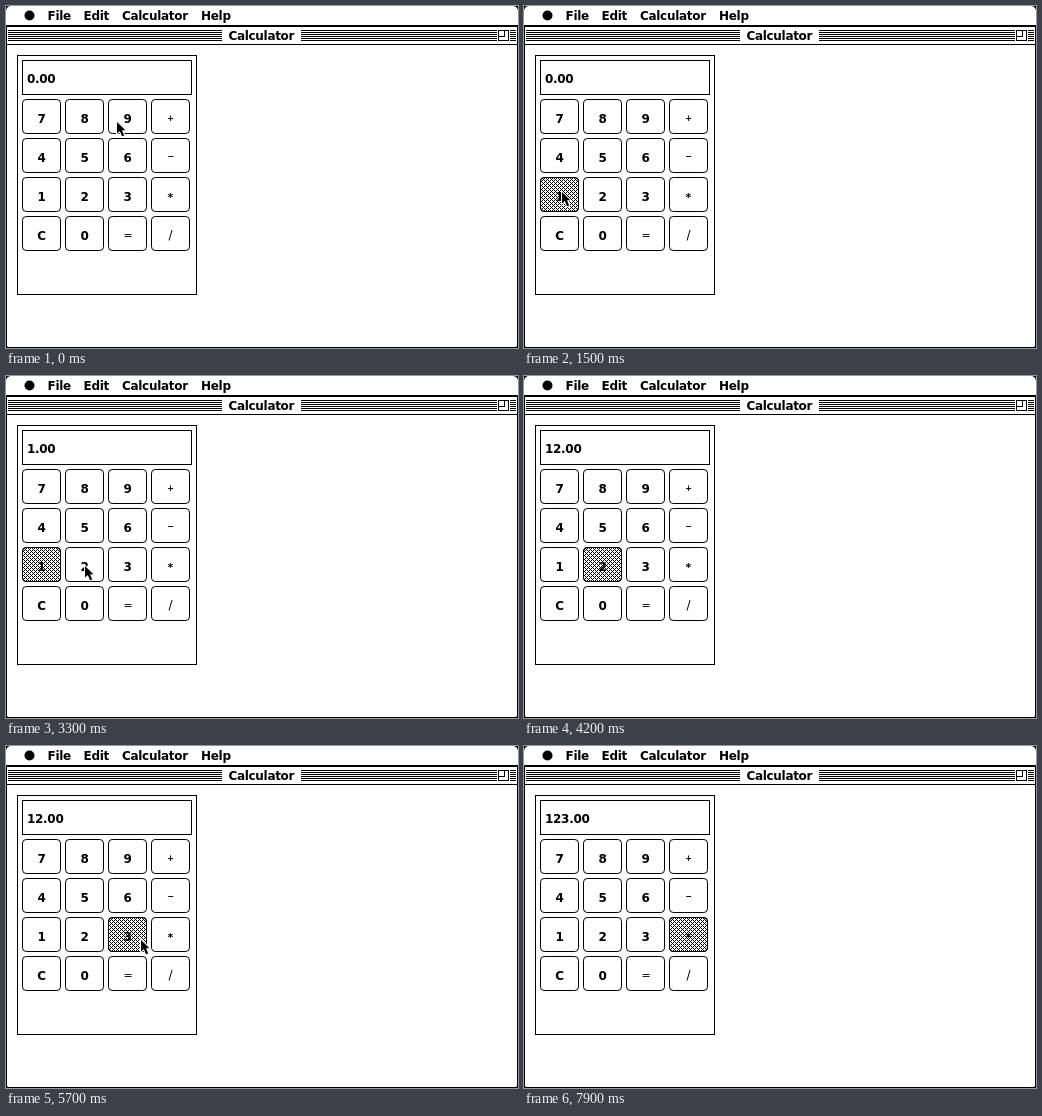
Animation of 512x342 px, one loop 8000 ms. Source, as an HTML page:

```html
<!DOCTYPE html>
<html lang="en">
<head>
<meta charset="utf-8">
<title>Calculator</title>
<style>
html, body { margin: 0; width: 100%; height: 100%; overflow: hidden; background: #000; }
svg { display: block; width: 512px; height: 342px; }
rect, .lines, #grey { shape-rendering: crispEdges; }
.key { shape-rendering: auto; }
.box { fill: #fff; stroke: #000; }
.lines { stroke: #000; fill: none; }
text { font: bold 12px "DejaVu Sans", Verdana, sans-serif; letter-spacing: -.3px; fill: #000; }
.mid { text-anchor: middle; }
.op { letter-spacing: 0; }
.thin { font-weight: normal; }

.hi, .num { opacity: 0; animation: 8s step-end infinite; }
#k1 { animation-name: k1; }
#k2 { animation-name: k2; }
#k3 { animation-name: k3; }
#kx { animation-name: kx; }
#n0 { animation-name: n0; }
#n1 { animation-name: n1; }
#n2 { animation-name: n2; }
#n3 { animation-name: n3; }
#cursor { animation: move 8s linear infinite; }
#arrow { animation: blink 8s step-end infinite; }

@keyframes k1 { 0%, 33.75%, 46.25% { opacity: 0 } 15%, 40% { opacity: 1 } }
@keyframes k2 { 0%, 58.75% { opacity: 0 } 46.25% { opacity: 1 } }
@keyframes k3 { 0%, 65%, 96.25% { opacity: 0 } 58.75%, 71.25% { opacity: 1 } }
@keyframes kx { 0% { opacity: 0 } 96.25%, 100% { opacity: 1 } }
@keyframes n0 { 0% { opacity: 1 } 28.75%, 100% { opacity: 0 } }
@keyframes n1 { 0%, 52.5% { opacity: 0 } 28.75% { opacity: 1 } }
@keyframes n2 { 0%, 77.5% { opacity: 0 } 52.5% { opacity: 1 } }
@keyframes n3 { 0% { opacity: 0 } 77.5%, 100% { opacity: 1 } }
@keyframes blink { 0%, 53.75% { opacity: 1 } 52.5%, 98.75%, 100% { opacity: 0 } }
@keyframes move {
  0%, 1.25% { transform: translate(111px, 116px) }
  6.25% { transform: translate(66px, 174px) }
  11.25%, 28.75% { transform: translate(38px, 186px) }
  35%, 38.75% { transform: translate(57px, 190px) }
  41.25% { transform: translate(79px, 190px) }
  43.75%, 46.25% { transform: translate(87px, 191px) }
  50%, 53.75% { transform: translate(88px, 196px) }
  58.75% { transform: translate(130px, 192px) }
  60% { transform: translate(142px, 191px) }
  62.5%, 77.5% { transform: translate(135px, 194px) }
  78.75% { transform: translate(135px, 197px) }
  80%, 87.5% { transform: translate(135px, 193px) }
  96.25%, 100% { transform: translate(159px, 187px) }
}
</style>
</head>
<body>
<svg viewBox="0 0 512 342">
  <defs>
    <pattern id="grey" width="4" height="4" patternUnits="userSpaceOnUse">
      <path d="M1 0h1v1h-1zM0 1h1v1h-1zM2 1h1v1h-1zM3 2h1v1h-1zM0 3h1v1h-1zM2 3h1v1h-1z"/>
    </pattern>
  </defs>
  <rect width="512" height="342"/>
  <rect class="key" width="512" height="342" rx="5" fill="#fff"/>

  <circle cx="23.5" cy="9.5" r="5"/>
  <text x="41.5" y="14">File</text>
  <text x="77.5" y="14">Edit</text>
  <text x="116" y="14">Calculator</text>
  <text x="195" y="14">Help</text>

  <path class="lines" d="M0 19.5H512M0 20.5H512M0 38.5H512M.5 20V342M511.5 20V342M0 341.5H512"/>
  <path class="lines" id="stripes"/>
  <rect x="216" y="23" width="79" height="13" fill="#fff"/>
  <text class="mid" x="255.3" y="34">Calculator</text>
  <rect x="491" y="23" width="13" height="13" fill="#fff"/>
  <path class="lines" d="M492.5 24.5H502.5V34.5H492.5ZM492.5 30.5H498.5V24.5"/>

  <rect class="box" x="11.5" y="49.5" width="179" height="239"/>
  <rect class="box" x="16.5" y="54.5" width="169" height="34"/>
  <text class="num" id="n0" x="21" y="77">0.00</text>
  <text class="num" id="n1" x="21" y="77">1.00</text>
  <text class="num" id="n2" x="21" y="77">12.00</text>
  <text class="num" id="n3" x="21" y="77">123.00</text>

  <g id="keys"></g>

  <g id="cursor">
    <path id="arrow" d="M0 0V11.5L2.8 9L5 14.3L7.2 13.4L5 8.2H8.4Z" stroke="#fff" stroke-width="2" paint-order="stroke"/>
  </g>
</svg>
<script>
const ids = { 1: 'k1', 2: 'k2', 3: 'k3', '*': 'kx' };
// glyph, font size, x and baseline of the operator signs, extra class
const ops = {
  '+': ['+', 8, 19.5, 21.5, ''],
  '-': ['\u2212', 8, 19.5, 21, ''],
  '*': ['*', 11, 19.5, 24, ''],
  '=': ['=', 11, 20, 23, 'thin'],
  '/': ['/', 12, 19.5, 23, 'thin'],
};

function key(c, i) {
  const x = 16 + i % 4 * 43, y = 93 + (i >> 2) * 39;
  const shape = 'x=".5" y=".5" width="38" height="34" rx="3.7"';
  const shade = ids[c] ? `<rect class="key hi" id="${ids[c]}" ${shape} fill="url(#grey)" stroke="#000"/>` : '';
  const [sign, size, tx, ty, cls] = ops[c] || [c, 12, 19.6, 24, ''];
  const kind = ops[c] ? 'op ' + cls : '';
  return `<g transform="translate(${x} ${y})"><rect class="key box" ${shape}/>${shade}
    <text class="mid ${kind}" style="font-size:${size}px" x="${tx}" y="${ty}">${sign}</text></g>`;
}
document.getElementById('keys').innerHTML = [...'789+456-123*C0=/'].map(key).join('');

let d = '';
for (let y = 24.5; y < 36; y += 2) d += `M2 ${y}H510`;
document.getElementById('stripes').setAttribute('d', d);
</script>
</body>
</html>
```
